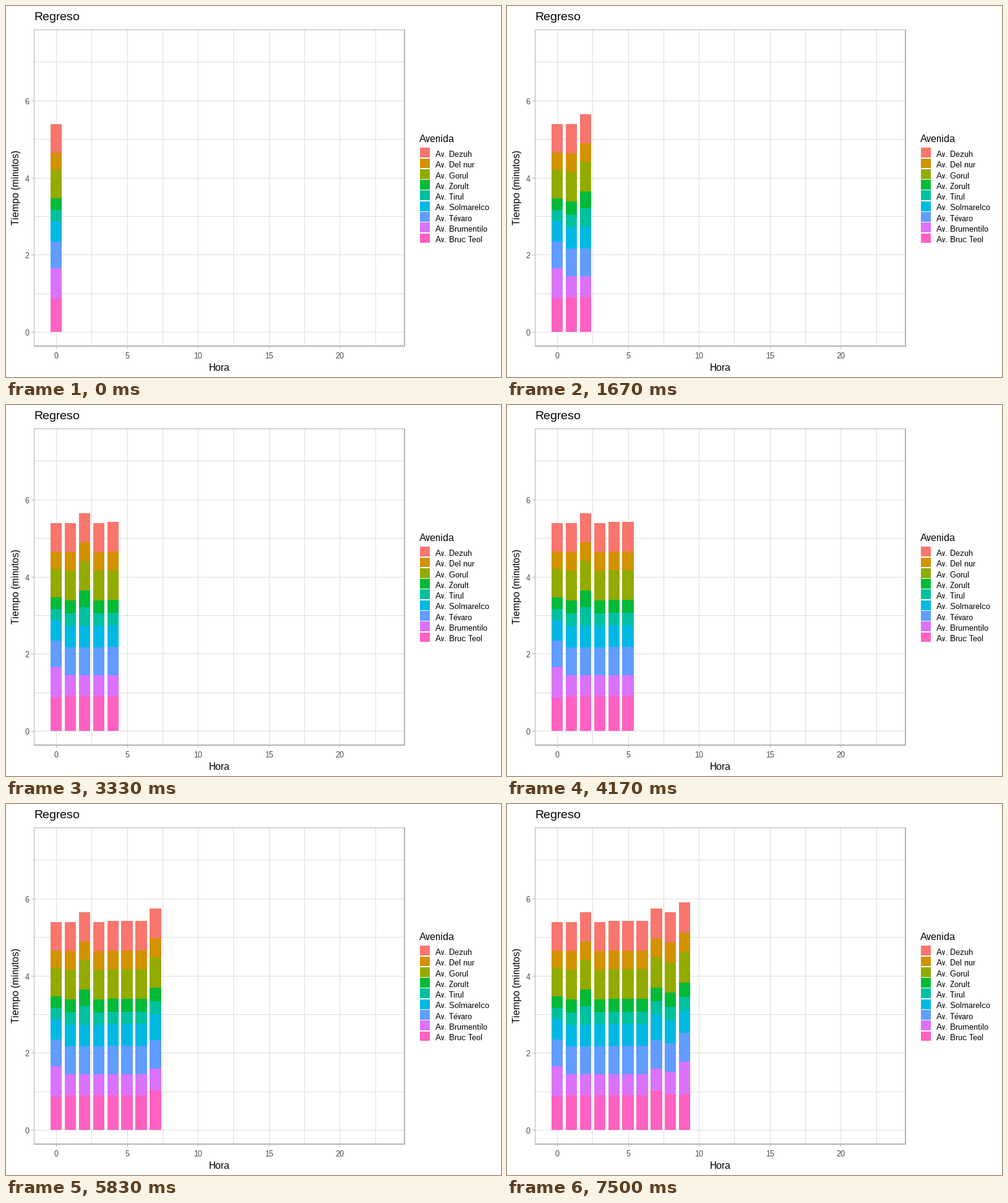
Write a matplotlib script that moves like this. It is 800 px wide and 600 px high and loops after 8000 ms.

```python
import matplotlib.pyplot as plt
import numpy as np
from matplotlib.animation import FuncAnimation
from matplotlib.patches import Rectangle

W, H, DPI = 800, 600, 100
LOOP, STEP = 8000, 20          # ms
HOURS = 10
X0, DX = 81.065, 22.909        # hour 0 and pixels per hour
Y0, DY = 527.3, 62.43          # minute 0 and pixels per minute
HALF_BAR = 9.16
KEY_PITCH = 17.27
GRID, BORDER, TICK_TEXT = "#DEDEDE", "#B3B3B3", "#4D4D4D"

# Name, colour and usual minutes, in legend order
STREETS = [
    ("Av. Dezuh", "#F8766D", 0.755),
    ("Av. Del nur", "#D39200", 0.48),
    ("Av. Gorul", "#93AA00", 0.77),
    ("Av. Zorult", "#00BA38", 0.335),
    ("Av. Tirul", "#00C19F", 0.32),
    ("Av. Solmarelco", "#00B9E3", 0.56),
    ("Av. Tévaro", "#619CFF", 0.72),
    ("Av. Brumentilo", "#DB72FB", 0.545),
    ("Av. Bruc Teol", "#FF61C3", 0.9),
]

# Extra minutes at (hour, street index)
JAMS = {(0, 7): 0.26, (2, 3): 0.10, (2, 4): 0.16,
        (7, 5): 0.10, (7, 8): 0.11, (9, 7): 0.26}

plt.rcParams.update({
    "font.family": "Liberation Sans",
    "text.hinting": "default",
    "text.hinting_factor": 1,
})
fig = plt.figure(figsize=(W / DPI, H / DPI), dpi=DPI, facecolor="white")
ax = fig.add_axes([0, 0, 1, 1])
ax.set_xlim(0, W)
ax.set_ylim(H, 0)
ax.axis("off")


def px(hour):
    return round(X0 + DX * hour)


def py(minute):
    return round(Y0 - DY * minute)


def box(left, top, right, bottom, color, z=1):
    patch = Rectangle((left, top), right - left, bottom - top, facecolor=color,
                      linewidth=0, antialiased=False, zorder=z)
    return ax.add_patch(patch)


def label(x, y, text, size, color="black", **kw):
    ax.text(x, y, text, fontsize=size * 72 / DPI, color=color,
            va="baseline", **kw)


def draw_panel():
    for i in range(10):
        x = px(2.5 * i)
        box(x, 39, x + 1, 550, GRID)
    for minute in range(8):
        y = py(minute)
        box(46, y, 644, y + 1, GRID)

    for hour in range(0, 21, 5):
        x = px(hour)
        box(x, 550, x + 1, 554, BORDER)
        label(x, 570, str(hour), 13, TICK_TEXT, ha="center")
    for minute in range(0, 7, 2):
        y = py(minute)
        box(41, y, 45, y + 1, BORDER)
        label(37.5, y + 6, str(minute), 13, TICK_TEXT, ha="right")

    # The frame is heavier on its right and bottom sides
    for edges in [(45, 38, 645, 39), (45, 549, 645, 551),
                  (45, 38, 46, 551), (643, 38, 645, 551)]:
        box(*edges, BORDER, z=3)

    label(45, 23, "Regreso", 19.5)
    label(345, 590, "Hora", 16, ha="center")
    label(21, 293, "Tiempo (minutos)", 16, ha="center",
          rotation=90, rotation_mode="anchor")


def draw_legend():
    label(668, 220, "Avenida", 16)
    for i, (name, color, _) in enumerate(STREETS):
        shift = KEY_PITCH * i
        box(669, round(229.4 + shift), 685, round(245.2 + shift), color)
        label(694, round(244 + shift), name, 13)


def draw_bar(hour):
    center = X0 + DX * hour
    left, right = round(center - HALF_BAR), round(center + HALF_BAR)
    # Every street slows a little from night to morning
    drift = np.interp(hour, [0, 1, 3, 4, 6, 8],
                      [-0.029, 0, 0, 0.0035, 0.0035, 0.029])
    parts = []
    total = 0
    for i in reversed(range(len(STREETS))):
        _, color, usual = STREETS[i]
        bottom = py(total)
        total += usual + drift + JAMS.get((hour, i), 0)
        parts.append(box(left, py(total), right, bottom, color, z=2))
    return parts


draw_panel()
draw_legend()
bars = [draw_bar(hour) for hour in range(HOURS)]


def update(i):
    # A new hour appears every 2500/3 ms
    last = (i * STEP + 15) * 3 // 2500
    for hour, parts in enumerate(bars):
        for part in parts:
            part.set_visible(hour <= last)
    return [part for parts in bars for part in parts]


anim = FuncAnimation(fig, update, frames=LOOP // STEP, interval=STEP,
                     init_func=lambda: update(0), repeat=True, repeat_delay=0)
plt.show()
```
